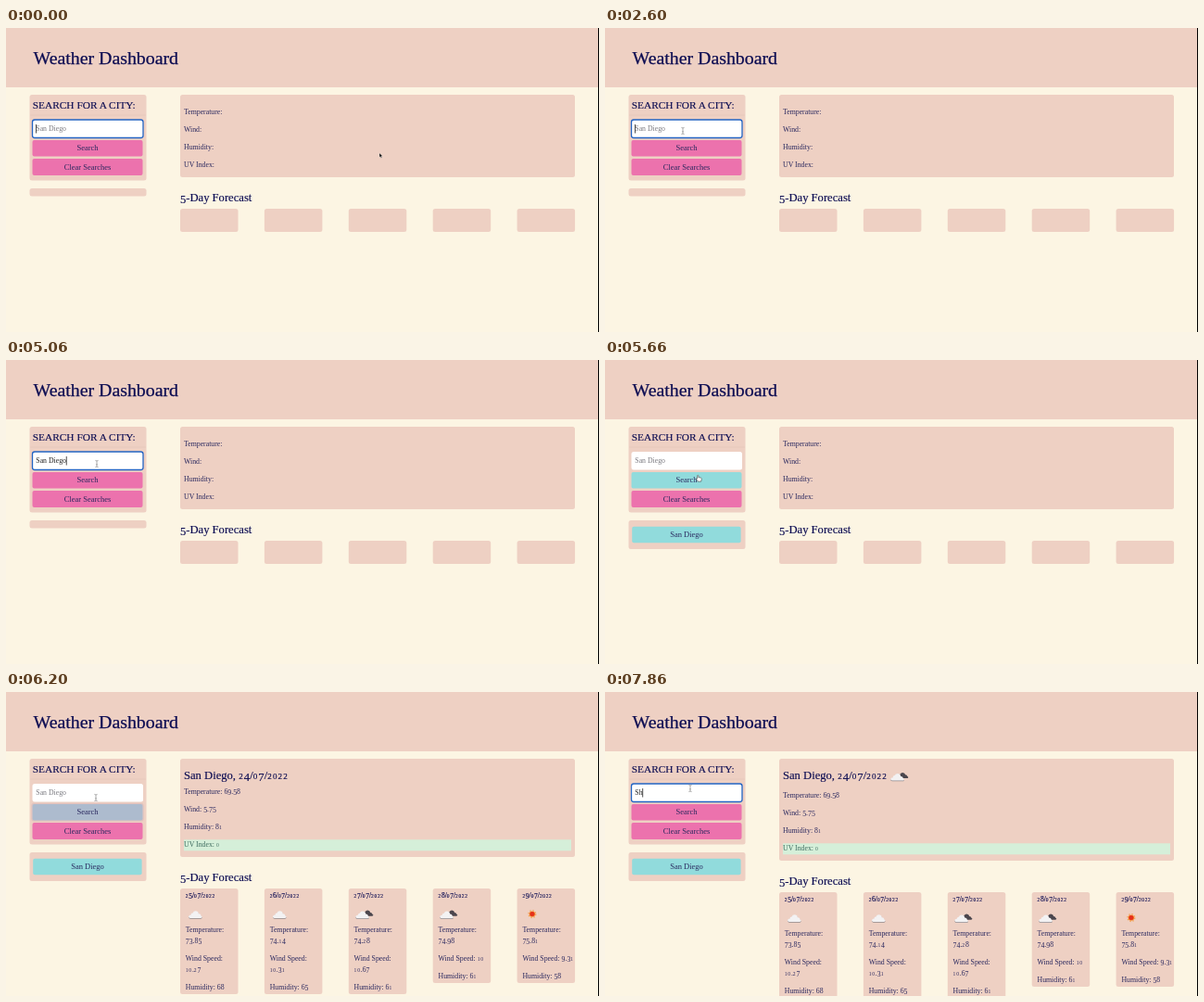
These frames come from a looping animation (640x328 px, 8000 ms). An HTML page:

```html
<!DOCTYPE html>
<html lang="en">
<head>
<meta charset="utf-8">
<title>Weather Dashboard</title>
<style>
html, body { margin: 0; width: 100%; height: 100%; overflow: hidden; background: #fcf5e3; }
svg { display: block; width: 640px; height: 328px; font: 7.8px "Liberation Serif", "Times New Roman", serif; }
text { fill: #2a285f; white-space: pre; }
.box { fill: #eed0c3; }
.pink { fill: #ec72ad; }
.cyan { fill: #91dbdc; }
.title, .caps, .head, .date { fill: #0c0c52; stroke: #0c0c52; stroke-width: .15px; }
.title { font-size: 19.85px; stroke-width: .25px; }
.caps { font-size: 11.35px; }
.head { font-size: 12.6px; }
.date { font-size: 7.5px; }
.btn { font-size: 8.5px; text-anchor: middle; }
/* old-style figures */
.low { baseline-shift: -.19em; }
.small { font-size: .72em; letter-spacing: .13em; }
#hint { fill: #7b7a80; }
#typed { fill: #222; }

/* 1% = 80ms */
.step { animation: 8s step-end infinite; }
.panel { animation-name: panel; }
.below { animation-name: below; }
.card { animation-name: card; }
.data { animation-name: data; }
.uv { animation-name: uv; }
.icon { animation-name: icon; }
.saved { animation-name: saved; }
.history { animation-name: history; }
.focus { animation-name: focus; }
.caret { animation-name: caret; }
.arrow { animation-name: arrow; }
.beam { animation-name: beam; }
.hand { animation-name: hand; }
.search { animation: search 8s linear infinite; }
.ring { animation: ring 8s linear infinite; }
.cursor { animation: move 8s ease-in-out infinite; }

@keyframes panel { 0% { height: 89px } 74.125% { height: 106px } 83.25%, 100% { height: 110px } }
@keyframes below { 0% { transform: none } 74.125% { transform: translateY(17px) } 83.25%, 100% { transform: translateY(21px) } }
@keyframes card { 0% { height: 25px } 74.125%, 100% { height: var(--h) } }
@keyframes data { 0% { opacity: 0 } 74.125%, 100% { opacity: 1 } }
@keyframes uv { 0% { fill: #2a285f } 74.125%, 100% { fill: #3f6b5f } }
@keyframes icon { 0% { opacity: 0 } 83.25%, 100% { opacity: 1 } }
@keyframes saved { 0% { opacity: 0 } 69.125%, 100% { opacity: 1 } }
@keyframes history { 0% { height: 8.5px } 69.125%, 100% { height: 31px } }
@keyframes focus { 0% { opacity: 1 } 69.125% { opacity: 0 } 88.375%, 100% { opacity: 1 } }
@keyframes caret {
  0%, 7.5%, 20%, 32.5%, 88.375%, 100% { opacity: 1 }
  1.625%, 14.125%, 26.625%, 69.125% { opacity: 0 }
}
@keyframes arrow { 0% { opacity: 1 } 7.5%, 100% { opacity: 0 } }
@keyframes beam { 0%, 65.5% { opacity: 0 } 7.5%, 76.94%, 100% { opacity: 1 } }
@keyframes hand { 0%, 76.94%, 100% { opacity: 0 } 65.5% { opacity: 1 } }
@keyframes search {
  0%, 65.5%, 78.8%, 100% { fill: #ec72ad }
  67.4%, 76.94% { fill: #91dbdc }
}
@keyframes ring { 0%, 76.94%, 90.2%, 100% { opacity: 0 } 78.8%, 88.375% { opacity: 1 } }
@keyframes move {
  0%, .75% { transform: translate(403px, 135px) }
  10.75%, 63.24% { transform: translate(84px, 111px) }
  63.25% { transform: translate(98px, 112px) }
  68.75%, 74.125% { transform: translate(101px, 128px) }
  77.5% { transform: translate(97px, 114px) }
  80.75%, 85% { transform: translate(96px, 107px) }
  92.5%, 100% { transform: translate(92px, 104px) }
}
</style>
</head>
<body>
<svg viewBox="0 0 640 328">
  <defs>
    <path id="puff" d="M-5.5 4.4q-1.9-.2-1.8-1.6q.2-1.5 2.4-1.8q.2-2 2-2.1q.9-2.2 3.2-2.2q2.9.1 3.4 3q2.3.1 2.6 2.2q1.4.5 1 1.6q-.4.9-1.7.9z"/>
    <g id="cloud"><use href="#puff" fill="#8f888c" y=".7"/><use href="#puff" fill="#f3f2f3"/></g>
    <g id="broken">
      <use href="#puff" fill="#4b464d" transform="translate(4 -1.4) scale(.85 .8)"/>
      <use href="#cloud" x="-1.5" y=".2"/>
    </g>
    <g id="sun">
      <circle r="3.9" fill="none" stroke="#f2a355" stroke-width="1.3" stroke-dasharray="1.4 1.66"/>
      <circle r="3.2" fill="#f58a2c"/><circle r="2.5" fill="#e5301c"/>
    </g>
  </defs>

  <rect width="640" height="328" fill="#fcf5e3"/>
  <rect class="box" width="640" height="64"/>
  <text class="title" x="29.5" y="39">Weather Dashboard</text>

  <rect class="box" x="25.5" y="72" width="126" height="92.5" rx="2.5"/>
  <path d="M26 94h125" stroke="#e3c3b8" stroke-width=".7"/>
  <text class="caps" x="28.8" y="87.3">SEARCH FOR A CITY:</text>
  <rect x="28.5" y="99" width="119.5" height="19.5" rx="2.5" fill="#fff"/>
  <rect class="step focus" x="28.5" y="99" width="119.5" height="19.5" rx="2.5" fill="none" stroke="#2364c4" stroke-width="1.3"/>
  <text id="hint" x="32.3" y="111.3">San Diego</text>
  <text id="typed" x="32.3" y="111.3"></text>
  <rect id="caret" class="step caret" y="104" width=".8" height="9.5" fill="#222"/>
  <rect class="ring" x="28" y="120.5" width="120" height="18.5" rx="2.5" fill="none" stroke="#c3a3b5" stroke-width="1.4"/>
  <rect class="search" x="28.5" y="121" width="119" height="17.5" rx="2"/>
  <text class="btn" x="88" y="132">Search</text>
  <rect class="pink" x="28.5" y="141" width="119" height="18" rx="2"/>
  <text class="btn" x="88" y="152.6">Clear Searches</text>

  <rect class="box step history" x="25.5" y="173" width="126" rx="2.5"/>
  <g class="step saved">
    <rect class="cyan" x="29.2" y="179.8" width="117.4" height="17.4" rx="2"/>
    <text class="btn" x="88" y="191">San Diego</text>
  </g>

  <rect class="box step panel" x="188" y="72" width="426" rx="2.5"/>
  <use class="step icon" href="#broken" x="317" y="91"/>
  <g id="below" class="step below">
    <rect class="step data" x="192" y="142.3" width="418" height="12" fill="#d5efd9"/>
  </g>

  <path d="M639.5 0v328" stroke="#000"/>

  <g class="cursor">
    <path class="step arrow" d="M0 0v4.6l1.1-1 .8 1.7.8-.4-.8-1.6h1.5z" fill="#111" stroke="#fff" stroke-width=".25"/>
    <path class="step beam" d="M-1.6-3.6q1.6 0 1.6 1v5.2q0 1-1.6 1M1.6-3.6q-1.6 0-1.6 1M0 2.6q0 1 1.6 1M-.8 .8h1.6" fill="none" stroke="#777" stroke-width=".6"/>
    <path class="step hand" d="M-1.3-3.4q.8-.8 1.2.2v1.8l2.6.5q.9.3.7 1.4l-.5 2.6h-3.4l-2.1-3q0-1 1.5 0z" fill="#fff" stroke="#444" stroke-width=".6"/>
  </g>
</svg>
<script>
const $ = id => document.getElementById(id);
const below = $('below'), hint = $('hint'), typed = $('typed'), caret = $('caret');

const figures = s => String(s)
  .replace(/[012]|[34579]/g, d => `<tspan class="${d < 3 ? 'small' : 'low'}">${d}</tspan>`);
const text = (x, y, s, cls = '') => `<text class="${cls}" x="${x}" y="${y}">${figures(s)}</text>`;
const data = s => `<g class="step data">${s}</g>`;

document.querySelector('.panel').insertAdjacentHTML('afterend',
  data(text(192, 94.3, 'San Diego, 24/07/2022', 'head')));

let html = text(188, 187, '5-Day Forecast', 'head');
const days = [
  [25, 'cloud', '73.85', '10.27', 68], [26, 'cloud', '74.14', '10.31', 65],
  [27, 'broken', '74.28', '10.67', 61], [28, 'broken', '74.98', '10', 61], [29, 'sun', '75.81', '9.31', 58]
];
days.forEach(([day, icon, temp, wind, hum], i) => {
  const x = 188 + 90.9 * i, tx = x + 5.8, wrap = wind.length > 4;
  html += `<rect class="box step card" style="--h:${wrap ? 114 : 102}px" x="${x}" y="195" width="62.5" rx="2.5"/>` + data(
    text(tx, 204.6, day + '/07/2022', 'date') +
    `<use href="#${icon}" x="${x + 16.3}" y="222.6"/>` +
    text(tx, 242, 'Temperature:') + text(tx, 254, temp) +
    (wrap ? text(tx, 273, 'Wind Speed:') + text(tx, 285, wind) : text(tx, 273, 'Wind Speed: ' + wind)) +
    text(tx, wrap ? 304.3 : 292.3, 'Humidity: ' + hum));
});
below.insertAdjacentHTML('beforeend', html);

// Each value follows its label at the label's measured width.
const now = [['Temperature: ', 69.58], ['Wind: ', 5.75], ['Humidity: ', 81], ['UV Index: ', 0]];
now.forEach(([label, value], i) => {
  const y = 93.4 + 19 * i, cls = i === 3 ? 'step uv' : '';
  below.insertAdjacentHTML('beforeend', text(192, y, label, cls));
  const x = 192 + below.lastElementChild.getComputedTextLength();
  below.insertAdjacentHTML('beforeend', data(text(x, y, value, cls)));
});

const words = [
  { text: 'San Diego', keys: [2800, 3130, 3460, 3660, 3830, 4130, 4330, 4530, 4660], end: 5530 },
  { text: 'Sh', keys: [7600, 7730], end: 8000 }
];
const clock = document.querySelector('.cursor').getAnimations()[0];

function draw() {
  const t = (clock.currentTime || 0) % 8000;
  const word = words.find(w => t < w.end);
  const s = word.text.slice(0, word.keys.filter(k => k <= t).length);
  if (typed.textContent !== s) typed.textContent = s;
  hint.style.opacity = s ? 0 : 1;
  caret.setAttribute('x', 32.1 + (s ? typed.getComputedTextLength() : 0));
  requestAnimationFrame(draw);
}
draw();
</script>
</body>
</html>
```
